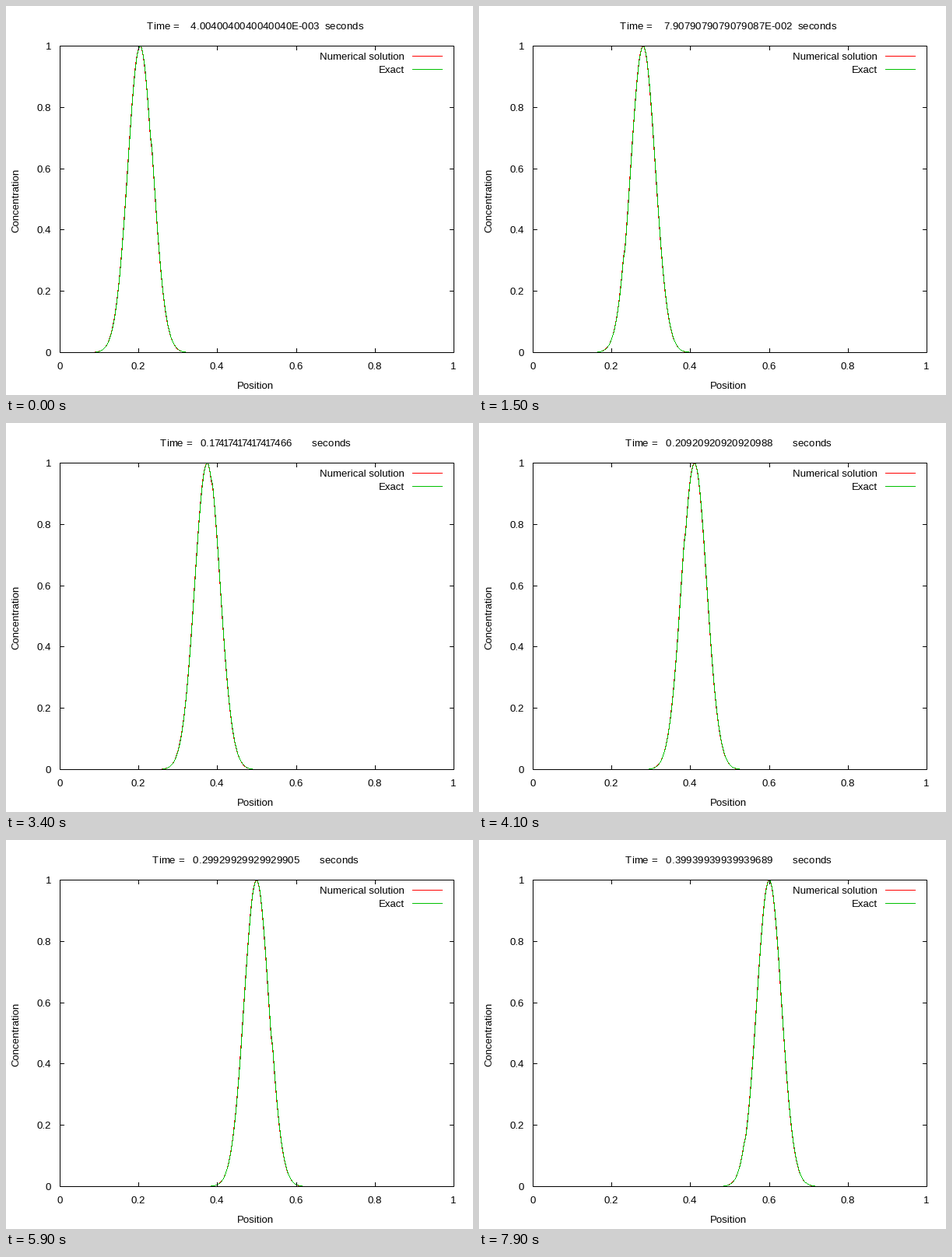
Recreate the animation shown at these times as a matplotlib script. Size 600x500 px, loop 8000 ms.

```python
import numpy as np
import matplotlib.pyplot as plt
from matplotlib.animation import FuncAnimation
from matplotlib.colors import to_rgba

W, H, DPI = 600, 500, 100
LEFT, RIGHT, TOP, BOTTOM = 69, 575, 51, 445
PX = 72 / DPI                  # one pixel in points
EM = 13.3                      # font size in pixels
FRAMES, INTERVAL = 80, 100
DT = 1 / 999
LAG = DT / 2                   # numerical curve trails the exact one
RED, GREEN = "#ff0000", "#00c000"

plt.rcParams.update({
    "font.family": "Liberation Sans",
    "font.size": EM * PX,
})

fig = plt.figure(figsize=(W / DPI, H / DPI), dpi=DPI, facecolor="white")
ax = fig.add_axes([0, 0, 1, 1])
canvas = ax.imshow(np.zeros((H, W, 4)), extent=(0, W, H, 0), aspect="auto",
                   interpolation="nearest", zorder=1)
ax.set_xlim(0, W)
ax.set_ylim(H, 0)
ax.axis("off")


def line(xs, ys, color="black"):
    # Snapping puts whole coordinates on pixel centres
    ax.plot(xs, ys, color=color, lw=PX, snap=True, zorder=5,
            solid_joinstyle="miter", solid_capstyle="projecting")


def label(x, y, text, ha="center", **kw):
    return ax.text(x, y, text, ha=ha, va="baseline", **kw)


# Frame, ticks and labels
line([LEFT, RIGHT, RIGHT, LEFT, LEFT], [TOP, TOP, BOTTOM, BOTTOM, TOP])
for i in range(6):
    x = int(LEFT + (RIGHT - LEFT) * i / 5 + 0.5)
    y = int(BOTTOM - (BOTTOM - TOP) * i / 5 + 0.5)
    name = f"{i / 5:g}"
    label(x, 467, name)
    label(58, y + 5, name, ha="right")
    if 0 < i < 5:
        for edge, step in ((BOTTOM, -5), (TOP, 5)):
            line([x, x], [edge, edge + step])
        for edge, step in ((LEFT, 5), (RIGHT, -5)):
            line([edge, edge + step], [y, y])
label(320, 492, "Position")
label(16, 250, "Concentration", rotation=90, rotation_mode="anchor")

# Key
for y, name, color in ((64, "Numerical solution", RED), (81, "Exact", GREEN)):
    label(512, y + 5, name, ha="right")
    line([522, 560], [y, y], color)

# Curves, drawn as one-pixel lines between whole-pixel points
pos = np.arange(0, 1000, 2) / 999


def to_pixel(v):
    return np.floor(v + 0.5).astype(int)


def trace(image, centre, color):
    conc = np.exp(-500 * (pos - centre) ** 2)
    xs = to_pixel(LEFT + (RIGHT - LEFT) * pos)
    ys = to_pixel(BOTTOM - (BOTTOM - TOP) * conc)
    for x0, y0, x1, y1 in zip(xs, ys, xs[1:], ys[1:]):
        if min(y0, y1) < BOTTOM:
            n = max(abs(x1 - x0), abs(y1 - y0)) + 1
            cols = to_pixel(np.linspace(x0, x1, n))
            rows = to_pixel(np.linspace(y0, y1, n))
            image[rows, cols] = to_rgba(color)


# Title, set glyph by glyph with tight kerning around the digit 1
ADVANCE = {"T": .611, "i": .222, "m": .833, " ": .278, "=": .584, ".": .278,
           "E": .667, "-": .333, "s": .5, "c": .5}
glyphs = [label(0, 30, "", ha="left") for _ in range(45)]


def kern(a, b):
    pair = a + b
    return -0.105 if pair.isdigit() and ("1" in pair or pair == "74") else 0


def set_title(text):
    xs, x = [], 0
    for a, b in zip(text, text[1:] + " "):
        xs.append(x)
        x += (ADVANCE.get(a, .556) + kern(a, b)) * EM
    start = 320 - x / 2
    for g in glyphs:
        g.set_text("")
    for g, ch, dx in zip(glyphs, text, xs):
        if ch != " ":
            g.set_text(ch)
            g.set_x(start + dx)


def time_text(t):
    if t < 0.1:
        mantissa, power = f"{t:.16E}".split("E")
        return f"Time =    {mantissa}E-{abs(int(power)):03d}  seconds"
    return f"Time =   {t:.17f}       seconds"


def elapsed(steps):
    t = 0.0
    for _ in range(steps):
        t += DT
    return t


def update(n):
    t = elapsed(4 + 5 * n)
    image = np.zeros((H, W, 4))
    trace(image, 0.2 + t - LAG, RED)
    trace(image, 0.2 + t, GREEN)
    canvas.set_data(image)
    set_title(time_text(t))
    return [canvas, *glyphs]


anim = FuncAnimation(fig, update, frames=FRAMES, interval=INTERVAL,
                     repeat=True, repeat_delay=0)
plt.show()
```
